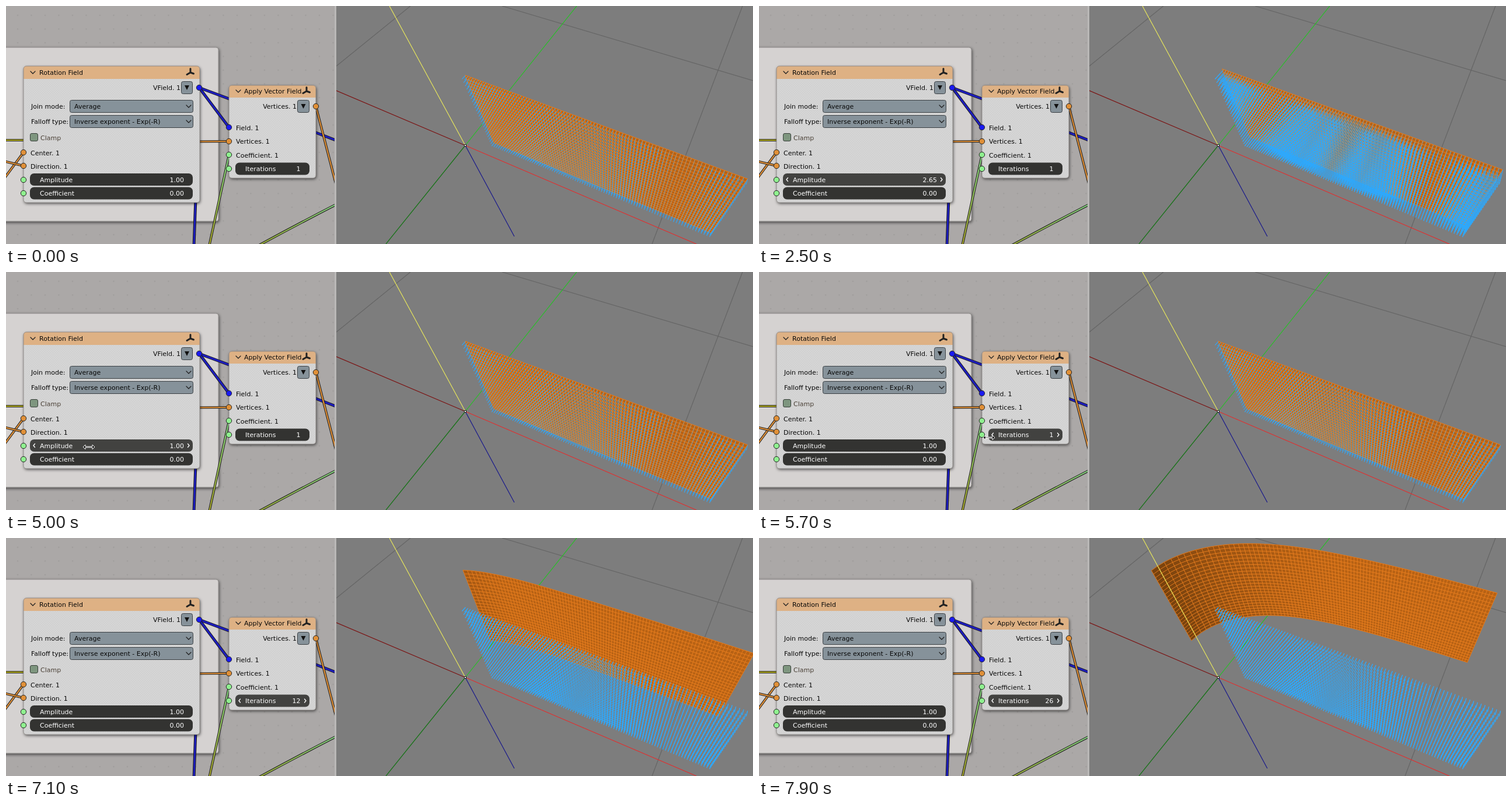
Animation, 1280 px wide and 408 px high, one loop 8 s. Source, as an HTML page with a canvas:

```html
<!DOCTYPE html>
<html lang="en">
<head>
<meta charset="utf-8">
<title>Rotation field</title>
<style>
html, body { margin: 0; width: 100%; height: 100%; overflow: hidden; background: #7d7d7d; }
#stage { position: absolute; left: 0; top: 0; width: 1280px; height: 408px; overflow: hidden; }
canvas { position: absolute; left: 566px; top: 0; }
svg { position: absolute; left: 0; top: 0; }
text { font: 11px "DejaVu Sans", sans-serif; fill: #080808; white-space: pre; }
.lite { fill: #fff; }
.end { text-anchor: end; }
.line { fill: none; stroke-linecap: round; stroke-linejoin: round; }
.field { fill: #333331; }
.field.hot { fill: #424240; }
.drop { fill: #86929a; stroke: #3b4044; }
.sock { stroke: #222; stroke-width: 1; }
</style>
</head>
<body>
<div id="stage">
<canvas id="view" width="714" height="408"></canvas>
<svg width="1280" height="408" viewBox="0 0 1280 408">
  <defs>
    <pattern id="dots" width="23.5" height="23.5" patternUnits="userSpaceOnUse" x="9" y="5">
      <rect x="10" y="10" width="2" height="2" fill="#9d9a99"/>
    </pattern>
    <pattern id="grain" width="4" height="4" patternUnits="userSpaceOnUse">
      <rect width="1" height="1" fill="#dcdcdc"/><rect x="2" y="2" width="1" height="1" fill="#dcdcdc"/>
    </pattern>
    <linearGradient id="toGreen" x1="0" y1="1" x2="0" y2="0">
      <stop offset="0" stop-color="#a8a428"/><stop offset="1" stop-color="#86dc86"/>
    </linearGradient>
    <linearGradient id="fromOlive" x1="0" y1="0" x2="1" y2="0">
      <stop offset="0" stop-color="#98a838"/><stop offset="1" stop-color="#80cc80"/>
    </linearGradient>
    <filter id="shade" x="-10%" y="-10%" width="120%" height="125%">
      <feDropShadow dx="1" dy="2" stdDeviation="2.5" flood-color="#000" flood-opacity=".6"/>
    </filter>
    <clipPath id="left"><rect width="563" height="408"/></clipPath>
    <g id="axes" class="line" stroke="#222" stroke-width="3">
      <path d="M0-5.500V1L-6 4.500M0 1L5.500 3"/>
    </g>
    <path id="down" class="line" stroke="#222" stroke-width="1.3" d="M-4-2L0 2L4-2"/>
    <path id="tri" fill="#111" d="M-4-4H4L0 4Z"/>
  </defs>

  <g clip-path="url(#left)">
    <rect width="563" height="408" fill="#aba8a7"/>
    <rect width="563" height="408" fill="url(#dots)"/>
    <rect x="-10" y="71" width="374" height="298" rx="4" fill="#d5d2d1" stroke="#8d8a89" filter="url(#shade)"/>
    <g id="wires" class="line"></g>

    <g filter="url(#shade)">
      <rect x="30" y="103" width="302" height="234" rx="5" fill="#d2d2d2"/>
      <rect x="382" y="136" width="149" height="159" rx="5" fill="#d2d2d2"/>
    </g>
    <rect x="31" y="125" width="300" height="209" fill="url(#grain)"/>
    <rect x="383" y="157" width="147" height="135" fill="url(#grain)"/>
    <path fill="#deb184" d="M30 125V108Q30 103 35 103H327Q332 103 332 108V125ZM382 157V141Q382 136 387 136H526Q531 136 531 141V157Z"/>
    <g fill="none" stroke="#8a8580" stroke-width=".8">
      <rect x="30" y="103" width="302" height="234" rx="5"/>
      <rect x="382" y="136" width="149" height="159" rx="5"/>
    </g>

    <use href="#down" x="46" y="114"/><text x="57" y="118">Rotation Field</text><use href="#axes" x="316" y="113"/>
    <use href="#down" x="398" y="146"/><text x="408" y="150">Apply Vector Field</text><use href="#axes" x="515" y="145"/>

    <text class="end" x="299" y="144">VField. 1</text>
    <text class="end" x="498" y="176">Vertices. 1</text>
    <g class="drop">
      <rect x="300.5" y="129.5" width="19" height="21" rx="3"/>
      <rect x="499.5" y="161.5" width="20" height="21" rx="3"/>
      <rect x="109.5" y="161.5" width="211" height="21" rx="3"/>
      <rect x="109.5" y="187.5" width="211" height="21" rx="3"/>
    </g>
    <use href="#tri" x="310" y="140"/><use href="#tri" x="509.5" y="172"/>
    <use href="#down" x="313" y="172"/><use href="#down" x="313" y="198"/>
    <text x="43" y="176">Join mode:</text><text x="117" y="176">Average</text>
    <text x="43" y="202">Falloff type:</text><text x="117" y="202">Inverse exponent - Exp(-R)</text>
    <rect x="41.5" y="218.5" width="13" height="13" rx="2.5" fill="#7e967f" stroke="#38403a"/>
    <text x="59" y="229.5" style="fill:#4c4238">Clamp</text>
    <text x="42" y="256">Center. 1</text><text x="42" y="279">Direction. 1</text>
    <text x="394" y="213">Field. 1</text><text x="394" y="236">Vertices. 1</text><text x="394" y="260">Coefficient. 1</text>

    <rect id="ampBox" class="field" x="41" y="287" width="279" height="21" rx="7"/>
    <rect class="field" x="41" y="310.5" width="279" height="21" rx="7"/>
    <rect id="iterBox" class="field" x="393" y="268.5" width="127" height="21" rx="7"/>
    <text class="lite" x="58" y="301.5">Amplitude</text><text id="amp" class="lite end" x="305" y="301.5">1.00</text>
    <text class="lite" x="58" y="325">Coefficient</text><text class="lite end" x="305" y="325">0.00</text>
    <text class="lite" x="410" y="283">Iterations</text><text id="iter" class="lite end" x="504.5" y="283">1</text>
    <path id="ampTips" class="line" stroke="#fff" stroke-width="1.3" d="M49.5 294.5L47 297.5L49.5 300.5M311.5 294.5L314 297.5L311.5 300.5"/>
    <path id="iterTips" class="line" stroke="#fff" stroke-width="1.3" d="M401.5 276L399 279L401.5 282M511.5 276L514 279L511.5 282"/>
    <g id="socks"></g>
  </g>
  <rect x="563" width="3" height="408" fill="#bab8b7"/>
  <path id="arrow" d="M0 0V16L4 12.5L6.5 18.5L9 17.5L6.5 11.5H11.5Z" fill="#111" stroke="#fff"/>
  <path id="sizer" d="M-10 0L-6-3.8V-.8H6V-3.8L10 0L6 3.8V.8H-6V3.8Z" fill="#111" stroke="#fff"/>
</svg>
</div>
<script>
const $ = id => document.getElementById(id);

// Node links and sockets
const wire = (d, color, w = 2.2) =>
  `<path d="${d}" stroke="#1c1c1c" stroke-width="${w + 2}"/><path d="${d}" stroke="${color}" stroke-width="${w}"/>`;
const BLUE = '#1d1dc0', ORANGE = '#e09038', GREEN = '#8ff08f';
$('wires').innerHTML =
  wire('M331 140L382 159L531 217L570 232', BLUE, 3) +
  wire('M331 140L382 208', BLUE, 3) +
  wire('M325 330L322 412', BLUE, 3) +
  wire('M320 232.5L382 232', ORANGE) +
  wire('M-4 230H34', '#b4ae20') +
  wire('M-4 297L30 251', ORANGE) +
  wire('M-4 266L30 274', ORANGE) +
  wire('M531 172L566 308', ORANGE) +
  wire('M348 412Q366 330 382 256', 'url(#toGreen)') +
  wire('M430 412Q500 374 570 338', 'url(#fromOlive)');
$('socks').innerHTML = [
  [331, 140, '#1a1af0'], [382, 208, '#1a1af0'], [382, 232, ORANGE], [531, 172, ORANGE],
  [30, 251, ORANGE], [30, 274, ORANGE], [30, 298, GREEN], [30, 321, GREEN], [382, 255, GREEN], [382, 279, GREEN]
].map(([x, y, c]) => `<circle class="sock" cx="${x}" cy="${y}" r="4.7" fill="${c}"/>`).join('');

// Perspective view
const g = $('view').getContext('2d');
const COLS = 90, ROWS = 24, X0 = 66, X1 = 415, Z0 = 40, Z1 = 192, STEP = 6.95;
const EDGE_BIAS = 8; // depth by which mesh edges are pulled towards the viewer
const colX = i => X0 + (X1 - X0) * i / COLS;
const rowZ = j => Z0 + (Z1 - Z0) * j / ROWS;

function project(x, y, z) {
  const w = 1 - .000408 * x + .000832 * y - .001292 * z;
  return [(787 + .4937 * x + 1.2645 * y - 1.3178 * z) / w,
          (239 + .2505 * x - .5619 * y - .8579 * z) / w];
}

function path(points) {
  points.forEach(([x, y], i) => i ? g.lineTo(x, y) : g.moveTo(x, y));
}

function line(color, ...points) {
  g.beginPath();
  path(points);
  g.strokeStyle = color;
  g.lineWidth = 1.2;
  g.stroke();
}

function vectors(length) {
  if (length <= 0) return;
  g.beginPath();
  for (let i = 0; i <= COLS; i++)
    for (let j = 0; j <= ROWS; j++)
      path([project(colX(i), 0, rowZ(j)), project(colX(i), length, rowZ(j))]);
  g.strokeStyle = '#2fa8fa';
  g.lineWidth = 1.1;
  g.stroke();
}

function meshPoints(arc) {
  return Array.from({ length: COLS + 1 }, (_, i) => {
    const r = colX(i), a = arc / r;
    return Array.from({ length: ROWS + 1 }, (_, j) => project(r * Math.cos(a), r * Math.sin(a), rowZ(j)));
  });
}

function meshFaces(grid, arc) {
  for (let i = 0; i < COLS; i++) {
    const dim = Math.min(1, Math.max(0, (arc / colX(i) - .8) / 1.9));
    g.fillStyle = g.strokeStyle = `rgb(${184 - 64 * dim},${98 - 32 * dim},${20 - 6 * dim})`;
    g.lineWidth = .6;
    g.beginPath();
    path([grid[i][0], grid[i][ROWS], grid[i + 1][ROWS], grid[i + 1][0]]);
    g.closePath();
    g.fill();
    g.stroke();
  }
}

function meshEdges(grid) {
  g.beginPath();
  grid.forEach(path);
  for (let j = 0; j <= ROWS; j++) path(grid.map(c => c[j]));
  g.strokeStyle = '#ee8020';
  g.lineWidth = .9;
  g.stroke();
}

function drawView(amp, iter) {
  const reach = STEP * amp, arc = reach * iter, grid = meshPoints(arc);
  g.setTransform(1, 0, 0, 1, 0, 0);
  g.fillStyle = '#7d7d7d';
  g.fillRect(0, 0, 714, 408);
  g.translate(-566, 0);
  line('#656565', [850, 0], [1280, 128]);
  line('#656565', [693, 0], [566, 103]);
  line('#656565', [1262, 0], [1107, 408]);
  line('#7c1212', [566, 145], [787, 239]);
  line('#e03030', [787, 239], [1183, 408]);
  line('#167316', [651, 408], [787, 239]);
  line('#22c422', [787, 239], [978, 0]);
  line('#18188c', [787, 239], [871, 395]);
  meshFaces(grid, arc);
  vectors(reach);
  meshEdges(grid);
  vectors(Math.min(reach, arc - EDGE_BIAS));
  line('#e6e55c', [787, 239], [657, 0]);
  g.fillStyle = '#222';
  g.fillRect(785, 237, 4, 4);
  g.fillStyle = '#fff';
  g.fillRect(786, 238, 2, 2);
}

// Timeline, in ms
const AMP = [[0, 1], [2200, 1.06], [2400, 1.9], [2500, 2.65], [2700, 2.68], [2800, 2.72], [2900, 2.7],
  [3100, 2.68], [3200, 2.66], [3300, 2.65], [3500, 1]];
const MESH_AMP = [...AMP.slice(0, -1), [5000, 1]];
const ITER = [[0, 1], [6400, 4], [6600, 7], [6700, 9], [6900, 11], [7100, 12], [7200, 14], [7300, 15],
  [7400, 17], [7500, 19], [7600, 21], [7700, 23], [7800, 25], [7900, 26]];
const MOVES = [
  [100, 900, 1262, 38, 380, 252],
  [900, 1800, 380, 252, 144, 299],
  [1800, 2000, 144, 299, 146, 299],
  [3300, 3600, 146, 299, 140, 295],
  [3600, 5000, 140, 295, 140, 295],
  [5000, 5800, 142, 300, 430, 281.5],
  [5800, 6100, 430, 281.5, 430, 281.5],
  [6100, 6200, 441, 281.5, 441, 281.5]
];
const at = (table, t) => table.filter(s => s[0] <= t).pop()[1];
const inside = (p, x0, y0, x1, y1) => p && p[0] >= x0 && p[0] <= x1 && p[1] >= y0 && p[1] <= y1;

function pointer(t) {
  const m = MOVES.find(m => t >= m[0] && t < m[1]);
  if (!m) return null;
  const k = (t - m[0]) / (m[1] - m[0]);
  return [m[2] + (m[4] - m[2]) * k, m[3] + (m[5] - m[3]) * k];
}

function show(id, on) { $(id).style.display = on ? '' : 'none'; }

let lastView = '';
function render(t) {
  const p = pointer(t);
  const overAmp = inside(p, 41, 287, 320, 308), overIter = inside(p, 393, 268, 520, 290);
  const ampHot = t >= 2000 && t < 3300 || overAmp && !(t >= 3600 && t < 5000);
  const iterHot = t >= 6200 || overIter;
  $('amp').textContent = at(AMP, t).toFixed(2);
  $('iter').textContent = at(ITER, t);
  $('ampBox').classList.toggle('hot', ampHot);
  $('iterBox').classList.toggle('hot', iterHot);
  show('ampTips', ampHot);
  show('iterTips', iterHot);
  const sizing = overAmp || overIter;
  show('sizer', p && sizing);
  show('arrow', p && !sizing);
  if (p) $(sizing ? 'sizer' : 'arrow').setAttribute('transform', `translate(${p[0]} ${p[1]})`);
  const amp = at(MESH_AMP, t), iter = at(ITER, t), key = amp + '/' + iter;
  if (key !== lastView) drawView(amp, iter);
  lastView = key;
}

const start = performance.now();
let lastStep = -1;
function tick() {
  const step = Math.floor((performance.now() - start) % 8000 / 100);
  if (step !== lastStep) render(step * 100);
  lastStep = step;
  requestAnimationFrame(tick);
}
tick();
</script>
</body>
</html>
```
